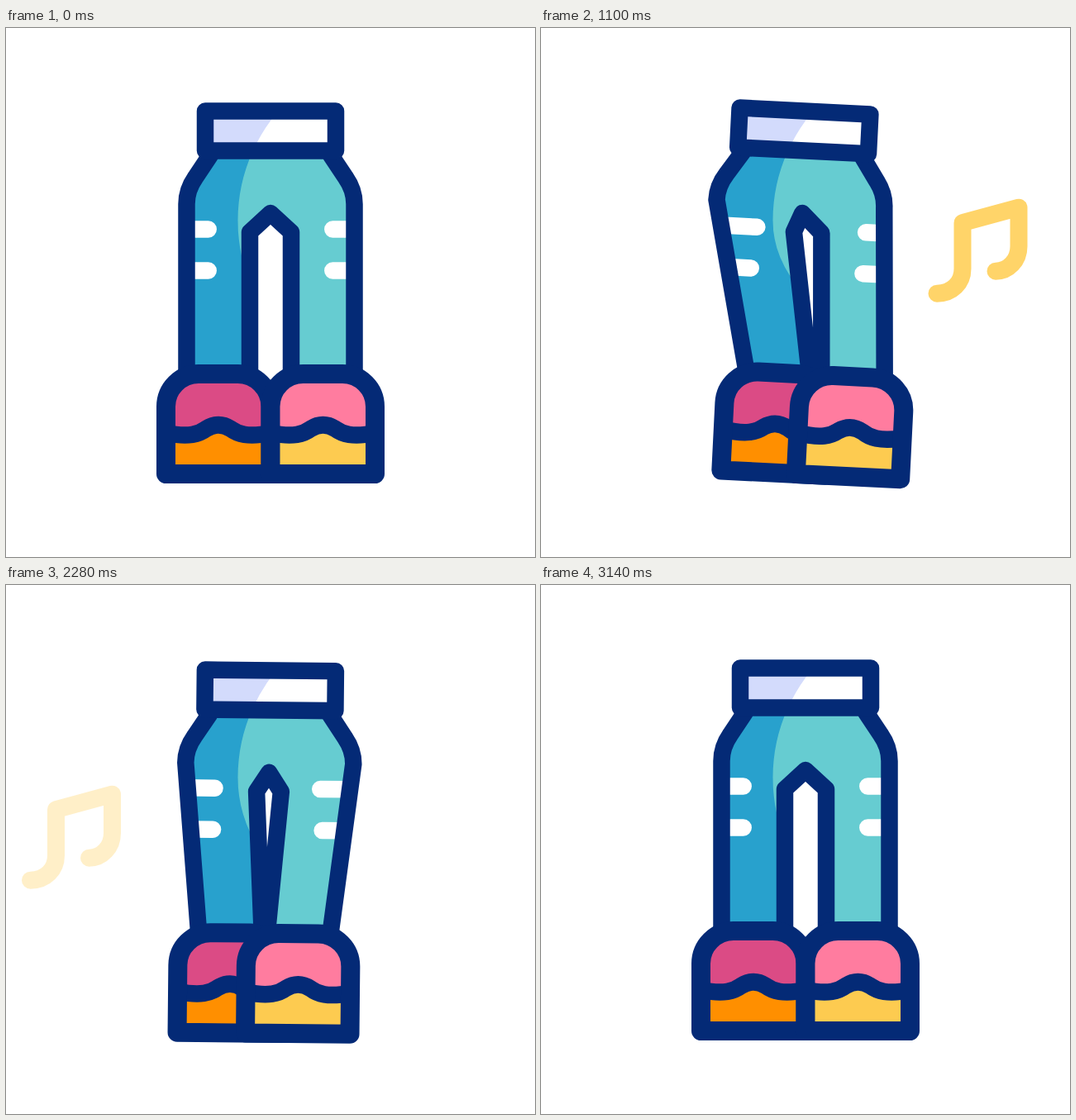
Animation of 640 by 640 pixels, one loop 3600 ms. Source, as an HTML page:

```html
<!DOCTYPE html>
<html lang="en">
<head>
<meta charset="utf-8">
<title>Dancing trousers</title>
<style>
  html, body { margin: 0; width: 100%; height: 100%; overflow: hidden; background: #fff; }
  svg { display: block; width: 100vw; height: 100vh; }
  .line { fill: none; stroke: #042a76; stroke-width: 20.5; stroke-linecap: round; stroke-linejoin: round; }
  .shoe .line { stroke-width: 23; }
  .shoe .wave { stroke-width: 20.5; stroke-linecap: butt; }
  .stripe { fill: none; stroke: #fff; stroke-width: 20.5; stroke-linecap: round; }
  .note { fill: none; stroke: #ffce55; stroke-width: 21; stroke-linecap: round; stroke-linejoin: round; opacity: 0; }
</style>
</head>
<body>
<svg viewBox="0 0 640 640">
  <defs>
    <clipPath id="shadow"><path id="shadowEdge"/></clipPath>
    <path id="shoeShape" d="M193.5 539.5V458a39.5 39.5 0 0 1 39.5 -39.5H280.5a39.5 39.5 0 0 1 39.5 39.5V539.5Z"/>
    <path id="sole" d="M194 539.5V490C222 495.5 234 491 242 485Q257 475.5 272 485C280 491 292 495.5 320 490V539.5Z"/>
    <path id="wave" d="M194 490C222 495.5 234 491 242 485Q257 475.5 272 485C280 491 292 495.5 320 490"/>
    <path id="noteShape" d="M29.5 358C48 358 60.5 345 60.5 328V272.5L128.5 254V301C128.5 318 116 331 100.5 331"/>
  </defs>

  <g class="body">
    <path id="pants" fill="#66ccd1"/>
    <rect x="241" y="100.5" width="158" height="48" fill="#fff"/>
  </g>
  <g clip-path="url(#shadow)">
    <g class="body">
      <path id="dark" fill="#28a1cd"/>
      <rect x="241" y="100.5" width="158" height="48" fill="#d3dbfc"/>
    </g>
  </g>
  <g class="body">
    <path id="stripes" class="stripe"/>
    <path id="outline" class="line"/>
    <rect class="line" x="241" y="100.5" width="158" height="48"/>
    <g class="shoe" id="leftShoe">
      <use href="#shoeShape" fill="#db4b85"/>
      <use href="#sole" fill="#ff8f00"/>
      <use href="#wave" class="line wave"/>
      <use href="#shoeShape" class="line"/>
    </g>
    <g class="shoe" id="rightShoe">
      <use href="#shoeShape" fill="#ff7c9f"/>
      <use href="#sole" fill="#fdcb50"/>
      <use href="#wave" class="line wave"/>
      <use href="#shoeShape" class="line"/>
    </g>
  </g>
  <use href="#noteShape" class="note" id="leftNote"/>
  <use href="#noteShape" class="note" id="rightNote"/>
</svg>
<script>
  const LOOP = 3600, STEP = 20;
  const $ = id => document.getElementById(id);
  const bodies = document.querySelectorAll('.body');

  // [time, value] keys, eased in and out between each pair
  const tilt = [[0, 0], [325, 5], [670, -5], [985, 5], [1360, -5], [1710, 5],
                [2095, -5], [2440, 5], [2790, -5], [3140, 0]];
  const drop = [[0, 0], [400, 19], [1050, 0], [1280, 0], [1690, 19], [2480, 0]];
  const leftFoot = [[0, 0], [340, -15], [1140, 47], [1740, -4], [2250, 18], [2690, 18], [3140, 0]];
  const rightFoot = [[0, 0], [340, -31], [1140, 11], [1740, -48], [2250, -26], [2690, -26], [3140, 0]];

  function at(keys, t) {
    const i = keys.findIndex(k => k[0] > t);
    if (i < 0) return keys[keys.length - 1][1];
    const [t0, a] = keys[i - 1], [t1, b] = keys[i];
    return a + (b - a) * (1 - Math.cos(Math.PI * (t - t0) / (t1 - t0))) / 2;
  }

  function drawLegs(l, r) {
    const lo = 218.5 + l, ro = 421.5 + r, li = 295 + l, ri = 345 + r;
    const tip = 320 + 0.05 * (l + r), gap = l - r;
    const leftSide = `M247 154L229 181C222 191 218.5 202 218.5 213L${lo} 420`;
    const leftCrotch = `L${295 + 0.34 * l + 0.08 * gap} 247L${tip} 224`;
    const rightCrotch = `L${345 + 0.34 * r - 0.04 * gap} 247L${ri} 420`;
    const rightSide = 'L421.5 213C421.5 202 418 191 411 181L393 154';
    $('pants').setAttribute('d',
      `${leftSide}L${li} 420${leftCrotch}${rightCrotch}L${ro} 420${rightSide}Z`);
    $('dark').setAttribute('d', `${leftSide}L${li} 420${leftCrotch}L320 154Z`);
    $('outline').setAttribute('d',
      `${leftSide}M${li} 420${leftCrotch}${rightCrotch}M${ro} 420${rightSide}`);

    // the shadow edge stays put on the stage; only its foot follows the left leg
    $('shadowEdge').setAttribute('d',
      `M0 80H349.6A204 204 0 0 0 280.5 233Q280.5 268 ${292 + 0.2 * l} 300L400 450V640H0Z`);

    const stripe = (y, lean, pull) =>
      `M${218.5 + lean * l} ${y}H${244.7 + pull * l}M${421.5 + lean * r} ${y}H${395.3 + pull * r}`;
    $('stripes').setAttribute('d', stripe(243.5, 0.15, 0.52) + stripe(293.5, 0.39, 0.41));
    $('leftShoe').setAttribute('transform', `translate(${l} 0)`);
    $('rightShoe').setAttribute('transform', `translate(${126.5 + r} 0)`);
  }

  // each note floats up for 500 ms, three times, 880 ms apart
  function drawNote(id, x, start, t) {
    const p = (t - start) % 880 / 500;
    const on = t >= start && t < start + 2260 && p < 1;
    $(id).style.opacity = on ? 1 - Math.abs(2 * p - 1) : 0;
    if (on) $(id).setAttribute('transform', `translate(${x} ${10.7 - 150 * p ** 1.4})`);
  }

  function draw(now) {
    const t = Math.floor(now % LOOP / STEP) * STEP;
    const move = `translate(0 ${at(drop, t)}) rotate(${at(tilt, t)} 320 90)`;
    bodies.forEach(b => b.setAttribute('transform', move));
    drawLegs(at(leftFoot, t), at(rightFoot, t));
    drawNote('leftNote', 0, 440, t);
    drawNote('rightNote', 449.5, 880, t);
  }

  function tick() {
    draw(performance.now());
    requestAnimationFrame(tick);
  }
  tick();
</script>
</body>
</html>
```
